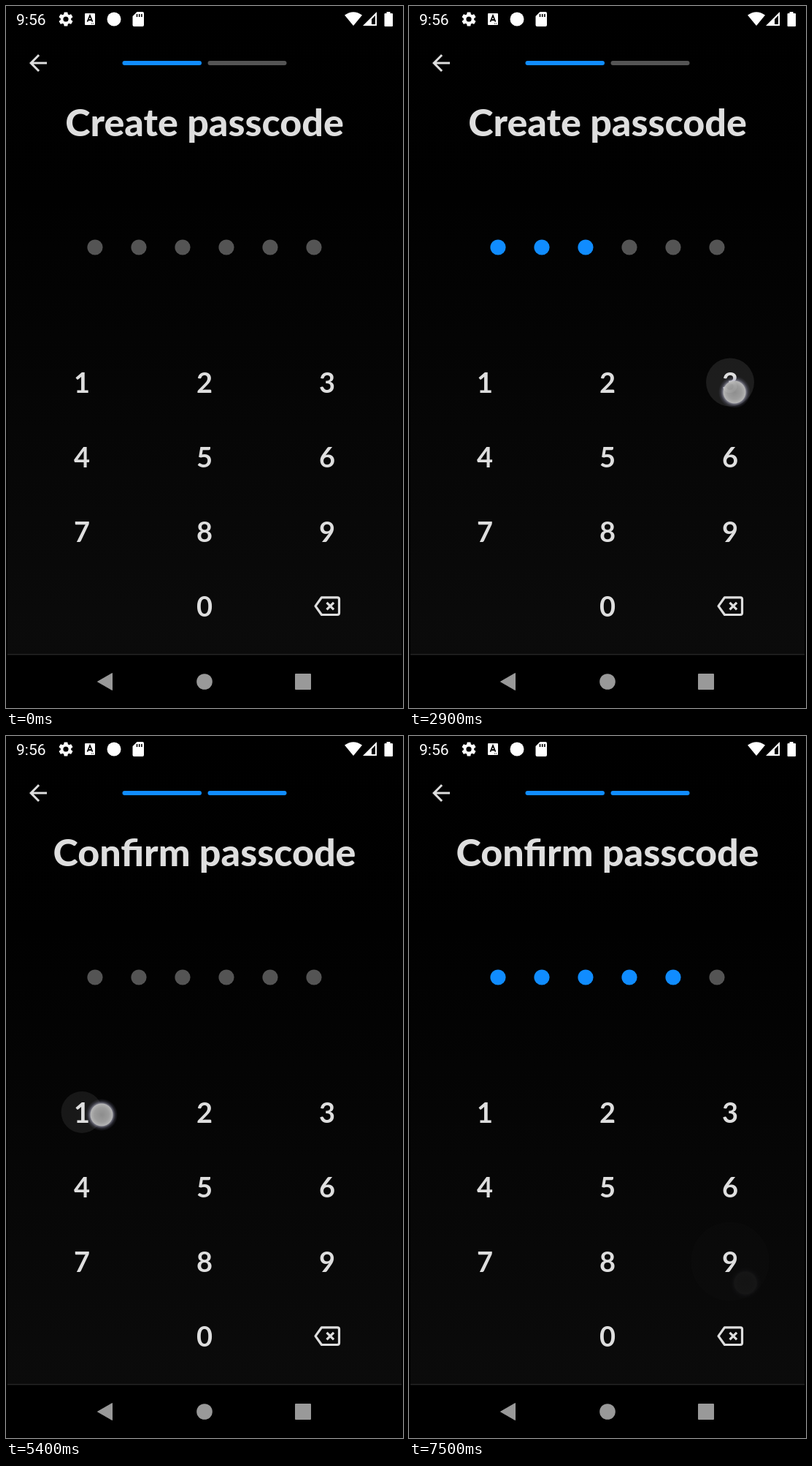
Animation of 544 by 960 pixels, one loop 8 s. Source, as an HTML page:

```html
<!DOCTYPE html>
<html lang="en">
<head>
<meta charset="utf-8">
<title>Passcode</title>
<style>
  html, body { margin: 0; width: 100%; height: 100%; overflow: hidden; background: #000; }
  svg { display: block; width: 544px; height: 960px; }
  text { font-family: Lato, sans-serif; fill: #dedede; text-anchor: middle; }
  .title { font-size: 52px; font-weight: 800; }
  .key { font-size: 38px; font-weight: 700; }
  .clock { font: 400 21px Roboto, sans-serif; fill: #fff; text-anchor: start; }
</style>
</head>
<body>
<svg viewBox="0 0 544 960">
  <defs>
    <linearGradient id="shade" x1="0" y1="0" x2="0" y2="1">
      <stop offset="0" stop-color="#000"/>
      <stop offset=".3" stop-color="#010101"/>
      <stop offset="1" stop-color="#0b0b0b"/>
    </linearGradient>
    <radialGradient id="tip">
      <stop offset="0" stop-color="#929292" stop-opacity=".96"/>
      <stop offset=".45" stop-color="#a2a2a2" stop-opacity=".96"/>
      <stop offset=".68" stop-color="#bababa" stop-opacity=".96"/>
      <stop offset=".73" stop-color="#b4b4c8" stop-opacity=".55"/>
      <stop offset=".85" stop-color="#9c9cc0" stop-opacity=".2"/>
      <stop offset="1" stop-color="#9090b8" stop-opacity="0"/>
    </radialGradient>
  </defs>
  <rect width="544" height="960"/>
  <rect x="2" width="540" height="887" fill="url(#shade)"/>
  <rect x="2" y="886" width="540" height="1.5" fill="#242424"/>

  <!-- status bar -->
  <text class="clock" x="14" y="26">9:56</text>
  <g fill="#fff">
    <path transform="translate(70 6)" d="M19.14 12.94c.04-.3.06-.61.06-.94 0-.32-.02-.64-.07-.94l2.03-1.58a.49.49 0 0 0 .12-.61l-1.92-3.32a.49.49 0 0 0-.59-.22l-2.39.96c-.5-.38-1.03-.7-1.62-.94L14.4 2.81a.48.48 0 0 0-.48-.41h-3.84a.47.47 0 0 0-.47.41L9.25 5.35c-.59.24-1.13.57-1.62.94l-2.39-.96a.48.48 0 0 0-.59.22L2.74 8.87a.47.47 0 0 0 .12.61l2.03 1.58c-.05.3-.09.63-.09.94s.02.64.07.94l-2.03 1.58a.49.49 0 0 0-.12.61l1.92 3.32c.12.22.37.29.59.22l2.39-.96c.5.38 1.03.7 1.62.94l.36 2.54c.05.24.24.41.48.41h3.84c.24 0 .44-.17.47-.41l.36-2.54c.59-.24 1.13-.56 1.62-.94l2.39.96c.22.08.47 0 .59-.22l1.92-3.32a.47.47 0 0 0-.12-.61zM12 15.6a3.6 3.6 0 1 1 0-7.2 3.6 3.6 0 0 1 0 7.2z"/>
    <rect x="108" y="10" width="14" height="16" rx="1"/>
    <circle cx="148" cy="18" r="9.5"/>
    <path d="M179.500 8H187q2 0 2 2V26q0 2-2 2H175.500q-2 0-2-2V14z"/>
    <path d="M464 12.500Q476 4 488 12.500L476 27z"/>
    <path d="M508 8V27H489zM506 13L501 18V25H506z" fill-rule="evenodd"/>
    <path d="M521.500 8h5v2h2.500q1 0 1 1v16q0 1-1 1h-9.500q-1 0-1-1V11q0-1 1-1h2z"/>
  </g>
  <path d="M111.500 21.500L115 13L118.500 21.500M112.700 19H117.300" fill="none" stroke="#000" stroke-width="1.800"/>
  <path d="M117 24H121" stroke="#000" stroke-dasharray="1 1"/>
  <path d="M179.500 11v4M182.700 11v4M185.900 11v4" stroke="#000" stroke-width="1.600"/>

  <!-- header -->
  <path transform="translate(26 60) scale(1.5)" fill="#dedede" d="M20 11H7.830l5.590-5.590L12 4l-8 8 8 8 1.410-1.410L7.830 13H20z"/>
  <rect x="159.500" y="75" width="108.500" height="6" rx="3" fill="#108cff"/>
  <rect id="bar" x="276.500" y="75" width="108" height="6" rx="3"/>
  <text id="title" class="title" x="272" y="178"></text>

  <g id="dots"></g>
  <circle id="ripple" fill="#fff"/>
  <g id="keys"></g>

  <g fill="none" stroke="#dedede" stroke-width="3.200" stroke-linejoin="round">
    <path d="M432.500 808.800H454q2.500 0 2.500 2.500V830q0 2.500-2.500 2.500H432.500L424 820.600z"/>
    <path d="M439.500 815.800l9.600 9.600M449.100 815.800l-9.600 9.600"/>
  </g>

  <!-- navigation bar -->
  <g fill="#999">
    <path d="M125.500 924L145.500 912.500V935.500z" stroke="#999" stroke-linejoin="round"/>
    <circle cx="272" cy="924" r="10.800"/>
    <rect x="396" y="913" width="22" height="22" rx="1"/>
  </g>
  <circle id="touch" r="22" fill="url(#tip)"/>
</svg>
<script>
const LOOP = 8000, STEP = 100, LAST = 7500, SWITCH = 4600;
const HOLD = 160, FADE = 150, GROW = 225;
const BLUE = '#108cff', GREY = '#545454';
const $ = id => document.getElementById(id);

// [press time, key, touch x, touch y]
const taps = [
  [390, 4, 112, 630], [1510, 1, 120, 540], [2240, 2, 274, 526],
  [2870, 3, 446, 528], [3690, 6, 448, 627], [4290, 5, 280, 622],
  [5390, 1, 131, 518], [5890, 2, 274, 524], [6160, 5, 269, 598],
  [6622, 6, 446, 622], [7200, 9, 461, 748]
];

function add(parent, tag, attrs, text = '') {
  const el = document.createElementNS('http://www.w3.org/2000/svg', tag);
  set(el, attrs);
  el.textContent = text;
  $(parent).append(el);
  return el;
}

function set(el, attrs) {
  for (const k in attrs) el.setAttribute(k, attrs[k]);
}

const keyPos = n => n
  ? [104 + 168 * ((n - 1) % 3), 514.5 + 102 * Math.floor((n - 1) / 3)]
  : [272, 820.5];

for (let n = 0; n < 10; n++) {
  const [x, y] = keyPos(n);
  add('keys', 'text', { class: 'key', x, y: y + 14 }, n);
}
const dots = Array.from({ length: 6 }, (_, i) =>
  add('dots', 'circle', { cx: 122 + 60 * i, cy: 330, r: 10.6 }));

function draw(time) {
  const t = Math.min(LAST, Math.floor(time / STEP) * STEP);
  const confirm = t >= SWITCH;
  $('title').textContent = confirm ? 'Confirm passcode' : 'Create passcode';
  $('bar').setAttribute('fill', confirm ? BLUE : GREY);

  const lit = taps.filter(([p]) => p > SWITCH === confirm && t >= p + HOLD).length;
  dots.forEach((d, i) => d.setAttribute('fill', i < lit ? BLUE : GREY));

  const tap = taps.find(([p]) => t >= p - 20 && t < p + HOLD + FADE);
  if (!tap) {
    set($('touch'), { opacity: 0 });
    set($('ripple'), { opacity: 0 });
    return;
  }
  const [p, key, x, y] = tap, u = t - p;
  const [cx, cy] = keyPos(key);
  const fade = Math.min(1, 1 - (u - HOLD) / FADE);
  const left = 1 - Math.max(0, Math.min(1, u / GROW));
  set($('touch'), { cx: x, cy: y, opacity: fade });
  set($('ripple'), {
    cx, cy,
    r: 54 - 28 * left * left,
    opacity: u < 0 ? 0 : 0.105 * fade * Math.min(1, 0.6 + u / 100)
  });
}

function tick(now) {
  draw(now % LOOP);
  requestAnimationFrame(tick);
}
draw(0);
requestAnimationFrame(tick);
</script>
</body>
</html>
```
